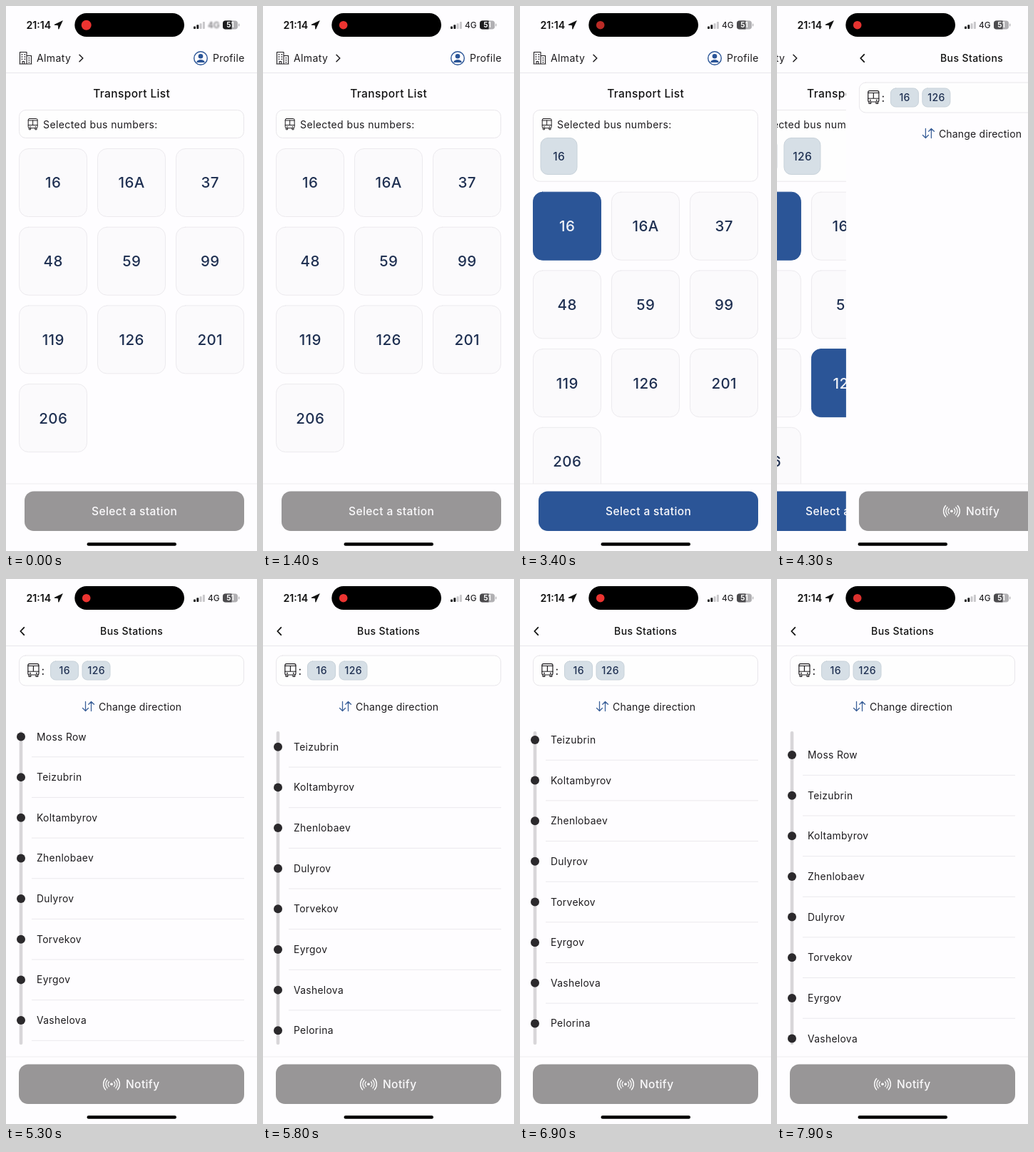
An HTML page with a canvas that plays this animation: 352x762 px, repeating every 8000 ms.

```html
<!DOCTYPE html>
<html lang="en">
<head>
<meta charset="utf-8">
<title>Transport list</title>
<style>
  html, body { margin: 0; width: 100%; height: 100%; overflow: hidden; background: #fefdff; }
  canvas { display: block; width: 352px; height: 762px; }
</style>
</head>
<body>
<canvas id="stage"></canvas>
<script>
const W = 352, H = 762, LOOP = 8000, STEP = 100;
const PAPER = '#fefdff', INK = '#1d1b1e', NAVY = '#1f3052', LINE = '#e9e7eb';
const BLUE = [43, 85, 151], GREY = [152, 150, 151], CARD = [251, 250, 252];
const BUSES = ['16', '16A', '37', '48', '59', '99', '119', '126', '201', '206'];
const STATIONS = ['Moss Row', 'Teizubrin', 'Koltambyrov', 'Zhenlobaev', 'Dulyrov',
  'Torvekov', 'Eyrgov', 'Vashelova', 'Pelorina'];

const canvas = document.getElementById('stage');
const ctx = canvas.getContext('2d');
const ratio = window.devicePixelRatio || 1;
canvas.width = W * ratio;
canvas.height = H * ratio;

const ramp = (t, from, to) => Math.min(1, Math.max(0, (t - from) / (to - from)));
const rgb = c => `rgb(${c.join(',')})`;
const mix = (a, b, p) => rgb(a.map((v, i) => Math.round(v + (b[i] - v) * p)));

function text(str, x, y, { size = 14, weight = 400, color = INK, align = 'left', gap = 0.4 } = {}) {
  ctx.font = `${weight} ${size}px Inter, sans-serif`;
  ctx.letterSpacing = `${gap}px`;
  ctx.textAlign = align;
  ctx.textBaseline = 'alphabetic';
  ctx.fillStyle = color;
  // Centre on the cap height
  ctx.fillText(str, x + (align === 'center' ? gap / 2 : 0), y + size * 0.364);
}

function box(x, y, w, h, r, fill, stroke) {
  ctx.beginPath();
  ctx.roundRect(x, y, w, h, r);
  if (fill) { ctx.fillStyle = fill; ctx.fill(); }
  if (stroke) { ctx.strokeStyle = stroke; ctx.lineWidth = 1; ctx.stroke(); }
}

function disc(x, y, r, color) {
  ctx.beginPath();
  ctx.arc(x, y, r, 0, Math.PI * 2);
  ctx.fillStyle = color;
  ctx.fill();
}

function lines(color, width, ...paths) {
  ctx.strokeStyle = color;
  ctx.lineWidth = width;
  ctx.lineCap = ctx.lineJoin = 'round';
  ctx.beginPath();
  for (const p of paths) {
    ctx.moveTo(p[0], p[1]);
    for (let i = 2; i < p.length; i += 2) ctx.lineTo(p[i], p[i + 1]);
  }
  ctx.stroke();
}

function rule(x1, x2, y, color = LINE) {
  ctx.fillStyle = color;
  ctx.fillRect(x1, y - 0.5, x2 - x1, 1);
}

function at(x, y, scale, draw) {
  ctx.save();
  ctx.translate(x, y);
  ctx.scale(scale, scale);
  draw();
  ctx.restore();
}

function busIcon(x, y, scale) {
  at(x, y, scale, () => {
    box(0.9, 0.5, 12.9, 13.2, 1.8, null, INK);
    lines(INK, 1, [0.9, 3, 13.8, 3], [0.9, 9.6, 13.8, 9.6], [7.35, 3, 7.35, 9.6],
      [2, 13.8, 2, 15.8, 4.2, 15.8, 4.2, 13.8], [10.5, 13.8, 10.5, 15.8, 12.7, 15.8, 12.7, 13.8]);
    disc(3.6, 11.7, 0.8, INK);
    disc(11.1, 11.7, 0.8, INK);
  });
}

function buildingIcon() {
  lines(INK, 1.1, [19.5, 81, 19.5, 64.5, 29, 64.5, 29, 81], [29, 69.5, 35.5, 69.5, 35.5, 81],
    [19, 81, 36, 81], [23, 81, 23, 77.5, 25.7, 77.5, 25.7, 81]);
  ctx.fillStyle = INK;
  for (let row = 0; row < 3; row++) {
    for (const x of [21.7, 25.6]) ctx.fillRect(x, 67 + row * 3.3, 1.5, 1.5);
    ctx.fillRect(31.6, 72 + row * 3, 1.5, 1.4);
  }
}

function profileIcon() {
  const blue = rgb(BLUE);
  ctx.beginPath();
  ctx.arc(273, 73, 9.3, 0, Math.PI * 2);
  ctx.strokeStyle = blue;
  ctx.lineWidth = 1.4;
  ctx.stroke();
  disc(273, 70.3, 3.3, blue);
  ctx.beginPath();
  ctx.ellipse(273, 79, 5.8, 4, 0, Math.PI, 0);
  ctx.fill();
}

function notifyIcon(x, y) {
  disc(x, y, 1.8, '#fff');
  ctx.strokeStyle = '#fff';
  ctx.lineWidth = 1.3;
  for (const r of [4.8, 8.1, 11.4]) {
    for (const side of [0, Math.PI]) {
      ctx.beginPath();
      ctx.arc(x, y, r, side - 0.75, side + 0.75);
      ctx.stroke();
    }
  }
}

function footer() {
  ctx.fillStyle = PAPER;
  ctx.fillRect(0, 668, W, H - 668);
  rule(0, W, 668, '#efedf0');
}

function chip(label, x, y, w, h, r, size) {
  box(x + 0.5, y + 0.5, w - 1, h - 1, r, '#d6dfe6', '#c8d2da');
  text(label, x + w / 2, y + h / 2, { size, weight: 500, color: NAVY, align: 'center' });
}

// Selection level of each chosen bus, 0 to 1
function selection(t) {
  return {
    '16': ramp(t, 1500, 1900),
    '37': ramp(t, 2300, 2600) - ramp(t, 3000, 3300),
    '126': ramp(t, 3400, 3600)
  };
}

function chosenBuses(t) {
  const list = [];
  if (t >= 1700) list.push('16');
  if (t >= 2400 && t < 3100) list.push('37');
  if (t >= 3500) list.push('126');
  return list;
}

function transportPage(t) {
  const chosen = chosenBuses(t), levels = selection(t);
  const shift = chosen.length ? 60.7 : 0;

  buildingIcon();
  text('Almaty', 43, 73);
  lines(INK, 1.5, [103, 68.2, 107.8, 73, 103, 77.8]);
  profileIcon();
  text('Profile', 290, 73, { gap: 0.3 });
  rule(0, W, 93.5);
  text('Transport List', 176, 122.5, { size: 15.5, weight: 500, color: '#111', align: 'center' });

  box(18.5, 145.5, 315, 39 + shift, 9, '#fefefe', LINE);
  busIcon(30.3, 157, 1);
  text('Selected bus numbers:', 52, 165.5);
  chosen.forEach((bus, i) => chip(bus, 28.5 + i * 61, 184, 52, 52, 10, 15.5));

  BUSES.forEach((bus, i) => {
    const x = 18 + (i % 3) * 110, y = 199 + shift + Math.floor(i / 3) * 109.7;
    const level = levels[bus] || 0;
    box(x + 0.5, y + 0.5, 95, 95, 13, mix(CARD, BLUE, level), mix([236, 234, 238], BLUE, level));
    text(bus, x + 48, y + 48, {
      size: 20.5, weight: 500, align: 'center', color: mix([31, 48, 82], [240, 242, 248], level)
    });
  });

  footer();
  box(26, 678.5, 308, 55.5, 13, mix(GREY, BLUE, ramp(t, 1600, 2000)));
  text('Select a station', 180, 706.3, { size: 15.5, weight: 500, color: '#fbfafc', align: 'center' });
}

function listOffset(t) {
  const glide = t < 5250 ? 0 : 73 * (1 - Math.exp(-3.3 * (t - 5200) / 1000));
  return glide - 78 * ramp(t, 7700, 7900);
}

function stationList(t) {
  box(18.7, 213, 4.6, 438, 2, '#d8d6d9');
  ctx.save();
  ctx.beginPath();
  ctx.rect(0, 207, W, 444);
  ctx.clip();
  STATIONS.forEach((name, i) => {
    const y = 241 + i * 56.65 - listOffset(t);
    disc(21, y, 6, '#2b292c');
    text(name, 43, y, { size: 13.8, gap: 0.35 });
    if (i < STATIONS.length - 1) rule(36, 334, y + 28.3, '#ebe9ed');
  });
  ctx.restore();
}

function stationsPage(t) {
  ctx.fillStyle = PAPER;
  ctx.fillRect(0, 0, W, H);
  lines('#111', 1.8, [25.3, 67.8, 20.3, 73, 25.3, 78.2]);
  text('Bus Stations', 176, 73, { weight: 500, color: '#111', align: 'center' });
  rule(0, W, 93.5);

  box(18.5, 107, 315, 42, 9, '#fefefe', LINE);
  busIcon(29.8, 118, 1.17);
  text(':', 49.5, 128, { size: 16 });
  chip('16', 62, 114.5, 40, 27, 7, 14);
  chip('126', 106.5, 114.5, 40, 27, 7, 14);

  lines('#3b6099', 1.3, [111.5, 171.5, 111.5, 184.5], [107.5, 180.5, 111.5, 184.5, 115.5, 180.5],
    [119.5, 184.5, 119.5, 171.5], [115.8, 175.3, 119.5, 171.5, 123.5, 175.3]);
  text('Change direction', 130, 178.5, { gap: 0.2 });

  if (t >= 4500) stationList(t);
  footer();
  box(18, 678.5, 316, 55.5, 13, rgb(GREY));
  notifyIcon(148, 706.3);
  text('Notify', 168, 706.3, { size: 15.5, weight: 500, color: '#fbfafc' });
}

function statusBar(t) {
  const settle = ramp(t, 0, 900);
  text('21:14', 28.5, 26.5, { size: 14.2, weight: 600, color: '#111', gap: 0 });
  ctx.fillStyle = '#111';
  ctx.beginPath();
  ctx.moveTo(79.3, 20.7);
  ctx.lineTo(67.5, 26.2);
  ctx.lineTo(73.2, 26.8);
  ctx.lineTo(73.8, 32.7);
  ctx.closePath();
  ctx.fill();
  lines('#111', 0.8, [79, 21, 68, 26.2, 73.2, 26.8, 73.8, 32.2, 79, 21]);

  box(96.3, 10, 153.7, 33, 16.5, '#000');
  const dim = Math.pow(Math.cos(Math.PI * (t - 3500) / 5000), 16);
  disc(112.7, 26.7, 7 - 1.2 * settle, mix([236, 52, 49], [184, 43, 38], dim));

  for (let i = 0; i < 4; i++) {
    const h = 3.6 + i * 2.1;
    box(263 + i * 4.3, 32 - h, 3, h, 0.8, i < 2 ? '#1b1b1d' : '#c9c8cb');
  }
  ctx.save();
  if (settle < 1) ctx.filter = `blur(${1.2 * (1 - settle)}px)`;
  text('4G', 283, 27, { size: 11.8, weight: 500, color: mix([110, 109, 112], [40, 39, 42], settle), gap: 0 });
  ctx.restore();

  ctx.save();
  ctx.beginPath();
  ctx.roundRect(304, 20.5, 21, 12, 3.8);
  ctx.clip();
  ctx.fillStyle = '#b1b0b3';
  ctx.fillRect(304, 20, 22, 13);
  ctx.fillStyle = t < 1700 ? '#1c1c1e' : '#4c4b4e';
  ctx.fillRect(304, 20, 12.5, 13);
  ctx.restore();
  box(326, 24.5, 1.3, 4, 0.7, '#b1b0b3');
  text('51', 314.5, 26.6, { size: 10, weight: 700, color: '#fff', align: 'center', gap: 0 });
}

function render(t) {
  ctx.setTransform(ratio, 0, 0, ratio, 0, 0);
  ctx.fillStyle = PAPER;
  ctx.fillRect(0, 0, W, H);

  const left = t < 4300 ? 1 : t >= 4700 ? 0 : Math.exp(-12.9 * (t - 4200) / 1000);
  if (left > 0) at(-110.5 * (1 - left), 0, 1, () => transportPage(t));
  if (left < 1) at(W * left, 0, 1, () => stationsPage(t));

  statusBar(t);
  box(113.5, 750.2, 125.5, 4.6, 2.3, '#000');
}

const start = performance.now();
function tick() {
  const t = (performance.now() - start) % LOOP;
  render(Math.floor(t / STEP) * STEP);
  requestAnimationFrame(tick);
}
tick();
</script>
</body>
</html>
```
